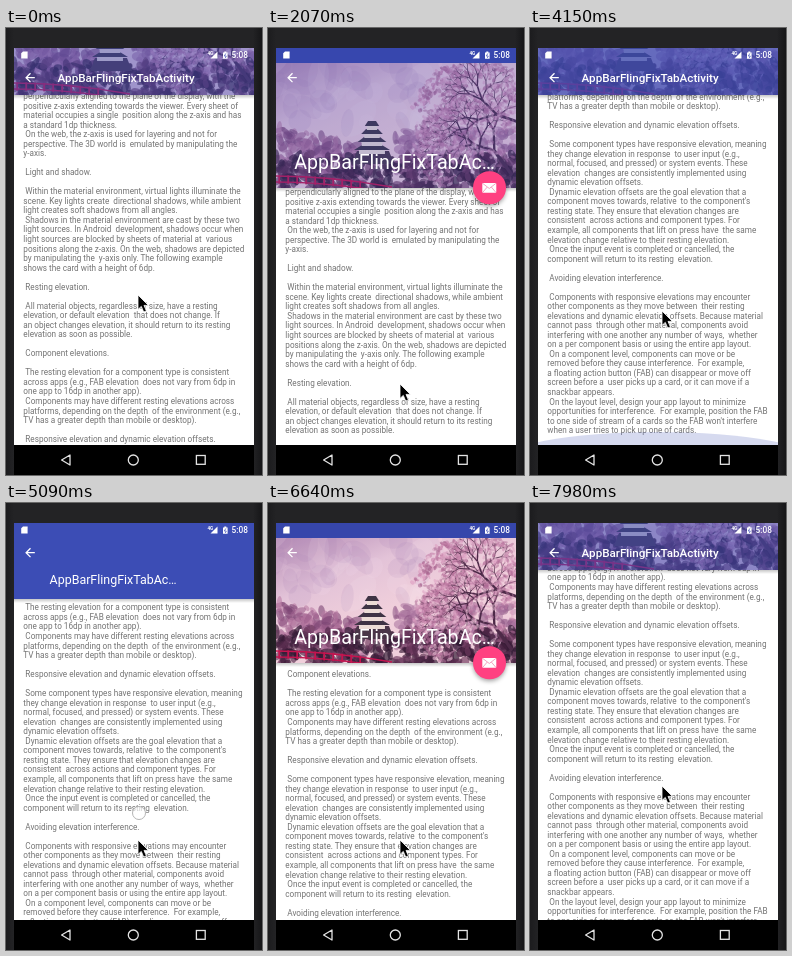
Recreate the animation shown at these times as an HTML page with a canvas. Size 256 px wide and 447 px high, loop 8000 ms.

```html
<!DOCTYPE html>
<html lang="en">
<head>
<meta charset="utf-8">
<title>Collapsing app bar</title>
<style>
html, body { margin: 0; width: 100%; height: 100%; overflow: hidden; background: #1e1e20; }
body { font-family: Roboto, "Noto Sans", sans-serif; }
#stage { position: relative; width: 256px; height: 447px; overflow: hidden;
  background: linear-gradient(90deg, #1c1c1e, #232325 8px, #232325 247px, #161618); }
#stage * { position: absolute; }
#screen { left: 8px; top: 20px; width: 240px; height: 398px; overflow: hidden; background: #fff; }
#text { left: 9.3px; top: 0; margin: 0; font: 8.2px/9.53px Roboto, "Noto Sans", sans-serif;
  color: #737373; white-space: pre; }
#glow { left: -40px; bottom: -46px; width: 319px; height: 60px; border-radius: 50%;
  background: rgba(63, 81, 181, .22); }
#header { left: 0; top: 0; width: 100%; overflow: hidden; background: #3646ab; }
#shade { left: 0; width: 100%; height: 4px; background: linear-gradient(rgba(0,0,0,.22), transparent); }
#photo { left: 0; bottom: 0; }
#scrim { inset: 0; background: #3c4db5; }
#title { left: 0; top: 0; line-height: 24px; color: #fff; white-space: pre; }
#fab { left: 197px; top: 0; width: 32.6px; height: 32.6px; border-radius: 50%;
  background: #ff4081; box-shadow: 0 2px 4px rgba(0,0,0,.35); }
#clock { left: 217.5px; top: 2px; font-size: 8.3px; line-height: 10px; font-weight: 500; color: #fff; }
#overlay { left: 0; top: 0; }
#touch { fill: rgba(255,255,255,.65); stroke: #b5b5b5; stroke-width: 1; }
</style>
</head>
<body>
<div id="stage">
  <div id="screen">
    <pre id="text">perpendicularly aligned to the plane of the display, with the
positive z-axis extending towards the viewer. Every sheet of
material occupies a single  position along the z-axis and has
a standard 1dp thickness.
 On the web, the z-axis is used for layering and not for
perspective. The 3D world is  emulated by manipulating the
y-axis.

 Light and shadow.

 Within the material environment, virtual lights illuminate the
scene. Key lights create  directional shadows, while ambient
light creates soft shadows from all angles.
 Shadows in the material environment are cast by these two
light sources. In Android  development, shadows occur when
light sources are blocked by sheets of material at  various
positions along the z-axis. On the web, shadows are depicted
by manipulating the  y-axis only. The following example
shows the card with a height of 6dp.

 Resting elevation.

 All material objects, regardless of size, have a resting
elevation, or default elevation  that does not change. If
an object changes elevation, it should return to its resting
elevation as soon as possible.

 Component elevations.

 The resting elevation for a component type is consistent
across apps (e.g., FAB elevation  does not vary from 6dp in
one app to 16dp in another app).
 Components may have different resting elevations across
platforms, depending on the depth  of the environment (e.g.,
TV has a greater depth than mobile or desktop).

 Responsive elevation and dynamic elevation offsets.

 Some component types have responsive elevation, meaning
they change elevation in response  to user input (e.g.,
normal, focused, and pressed) or system events. These
elevation  changes are consistently implemented using
dynamic elevation offsets.
 Dynamic elevation offsets are the goal elevation that a
component moves towards, relative  to the component's
resting state. They ensure that elevation changes are
consistent  across actions and component types. For
example, all components that lift on press have  the same
elevation change relative to their resting elevation.
 Once the input event is completed or cancelled, the
component will return to its resting  elevation.

 Avoiding elevation interference.

 Components with responsive elevations may encounter
other components as they move between  their resting
elevations and dynamic elevation offsets. Because material
cannot pass  through other material, components avoid
interfering with one another any number of ways,  whether
on a per component basis or using the entire app layout.
 On a component level, components can move or be
removed before they cause interference.  For example,
a floating action button (FAB) can disappear or move off
screen before a  user picks up a card, or it can move if a
snackbar appears.
 On the layout level, design your app layout to minimize
opportunities for interference.  For example, position the FAB
to one side of stream of a cards so the FAB won't interfere
when a user tries to pick up one of cards.</pre>
    <div id="glow"></div>
    <div id="shade"></div>
    <div id="header">
      <canvas id="photo" width="240" height="125"></canvas>
      <div id="scrim"></div>
    </div>
    <div id="title"></div>
    <div id="fab">
      <svg width="32.6" height="32.6" viewBox="0 0 32.6 32.6">
        <rect x="9.3" y="11.6" width="14" height="9.8" rx="1" fill="#fff"/>
        <path d="M9.8 12.2l6.5 5 6.5-5M9.8 21l4.4-5.2M22.8 21l-4.4-5.2" fill="none" stroke="#f08bb0" stroke-width=".8"/>
      </svg>
    </div>
    <div id="clock">5:08</div>
  </div>
  <svg id="overlay" width="256" height="447" viewBox="0 0 256 447">
    <g fill="#fff">
      <path d="M17 23.5h4.6v7h-6.4v-5.2z"/>
      <path d="M211.5 23.5v7h-7z"/>
      <path d="M217 24.4h1.3v-1h2v1h1.3v6.4H217z"/>
      <text x="201.4" y="27" font-size="4.6" font-weight="700">4G</text>
    </g>
    <path d="M219.9 25.4l-1.6 2.6h2l-1 2" fill="none" stroke="#3c4db5" stroke-width=".7"/>
    <path d="M28.8 49.7h-8.4M24.5 45.3l-4.4 4.4 4.4 4.4" fill="none" stroke="#fff" stroke-width="1.3"/>
    <path fill="#000" d="M8 417h240v30H8z"/>
    <g fill="none" stroke="#e4e4e4" stroke-width="1.3">
      <path d="M64 427v10l-8.4-5z" stroke-linejoin="round"/>
      <circle cx="127.3" cy="432" r="5"/>
      <rect x="190.4" y="427.5" width="8.8" height="8.8"/>
    </g>
    <circle id="touch" cx="133" r="6.5"/>
    <path id="cursor" d="M0 0v14.4l3.3-3 2.4 5.6 2.7-1.1-2.4-5.5h4.4z"
      fill="#000" stroke="#fff" stroke-width=".8"/>
  </svg>
</div>
<script>
const LOOP = 8000, PASS = 3960, LEAD = 1460; // one pass: open, collapse, drag open again
const MIN = 66.5, MAX = 159.6;
const $ = id => document.getElementById(id);

const ramp = (t, from, to) => Math.min(1, Math.max(0, (t - from) / (to - from)));
const smooth = x => x * x * (3 - 2 * x);
const slowing = x => 1 - (1 - x) ** 2;
const bump = (t, from, to) => Math.sin(Math.PI * ramp(t, from, to));

// moves: start, duration, distance
const flings = [[0, 900, 3.4], [2650, 1230, -317], [4700, 1450, 94.5], [6200, 2000, -71]];
const swipes = [[520, 500, 89], [3100, 500, -73], [4480, 500, 54], [7060, 500, -54]];
const travel = (moves, ease, t) =>
  moves.reduce((sum, [at, ms, way]) => sum + way * ease(ramp(t, at, at + ms)), 0);

function paintPhoto() {
  const c = $('photo').getContext('2d');
  let seed = 11;
  const rnd = () => (seed = seed * 16807 % 2147483647) / 2147483647;
  const pinks = ['#dc9cbf', '#c47fa8', '#efc9dc', '#a96590'];
  const darks = ['#3a1c38', '#55294c', '#6f3a60', '#2b1730'];

  function poly(color, ...p) {
    c.fillStyle = color;
    c.beginPath();
    for (let i = 0; i < p.length; i += 2) c.lineTo(p[i], p[i + 1]);
    c.fill();
  }
  function blobs(n, colors, alpha, size, place) {
    c.globalAlpha = alpha;
    for (let i = 0; i < n; i++) {
      const [x, y] = place(rnd(), rnd());
      c.fillStyle = colors[Math.floor(rnd() * colors.length)];
      c.beginPath();
      c.ellipse(x, y, size * (.4 + rnd()), size * (.3 + rnd() * .5), rnd() * 3, 0, 7);
      c.fill();
    }
    c.globalAlpha = 1;
  }
  function grow(x, y, len, dir) {
    const ex = x + len * Math.cos(dir), ey = y + len * Math.sin(dir);
    c.strokeStyle = '#4d2a48';
    c.lineWidth = len / 9;
    c.beginPath();
    c.moveTo(x, y);
    c.lineTo(ex, ey);
    c.stroke();
    blobs(3, pinks, .5, 2.6, (a, b) => [ex + (a - .5) * 11, ey + (b - .5) * 9]);
    if (len < 5) return;
    for (const turn of [-.5, .45]) grow(ex, ey, len * (.68 + rnd() * .16), dir + turn + rnd() * .3 - .15);
  }

  const sky = c.createLinearGradient(0, 0, 40, 100);
  sky.addColorStop(0, '#b48bb5');
  sky.addColorStop(.55, '#e3c3d8');
  sky.addColorStop(1, '#f0cfdb');
  c.fillStyle = sky;
  c.fillRect(0, 0, 240, 125);
  blobs(40, ['#f4e2ec', '#a47fae'], .13, 16, (a, b) => [a * 150, b * 60]);

  // woods and bank
  blobs(160, ['#9c5f8c', '#7d4674', '#b97ba3'], .6, 6, (a, b) => [a * 90, 62 + a * 22 + b * 40]);
  blobs(190, ['#a8719c', '#c48fb4', '#8a5482'], .55, 6, (a, b) => [118 + a * 122, 68 + b * 44]);
  blobs(320, darks, .65, 6, (a, b) => [a * 240, 92 + b * 34]);

  // castle, bottom tier first
  poly('#4a3548', 76, 101, 81, 88, 113, 88, 118, 101);
  for (let i = 0; i < 4; i++) {
    const half = 18 - 3.6 * i, y = 86 - 8 * i;
    c.fillStyle = '#ecdcd6';
    c.fillRect(96 - half * .72, y, half * 1.44, 5);
    poly('#3e3344', 96 - half, y + 1, 96 - half * .55, y - 4, 96 + half * .55, y - 4, 96 + half, y + 1);
  }

  // cherry trees and a hanging spray
  grow(236, 112, 30, -2.2);
  grow(205, 112, 22, -1.7);
  grow(245, 60, 26, -2.8);
  blobs(260, pinks, .4, 2.6, (a, b) => [240 - a * b * 100, 20 + a * 85]);
  blobs(100, pinks, .6, 2.8, (a, b) => [164 - a * 30 + b * 12, a * 44 + b * 5]);

  // bridge rails
  c.strokeStyle = '#c4144f';
  c.lineWidth = 1.4;
  for (const y of [113, 119]) {
    c.beginPath();
    c.moveTo(0, y);
    c.quadraticCurveTo(55, y, 116, y + 11);
    c.stroke();
  }
  for (let x = 3; x < 90; x += 9) c.strokeRect(x, 113 + x * x / 1300, .4, 7);
}

function draw(t) {
  const v = (t + LEAD) % PASS;
  const k = 1 - smooth(ramp(v, 400, 940)) + smooth(ramp(v, 2116, 3381));
  const h = MIN + (MAX - MIN) * k, folded = k < .005;
  const veil = ramp(v, 1190, 1790) - ramp(v, 2910, 3730);
  const fab = 1 - ramp(v, 740, 920) + ramp(v, 2800, 3000);

  $('header').style.height = h - 20 + 'px';
  $('shade').style.top = h - 20 + 'px';
  $('scrim').style.opacity = veil;
  $('text').style.top = Math.round(h + 1.5 + travel(flings, slowing, t) - 24.2) + 'px';
  $('glow').style.opacity = bump(t, 3800, 4400);

  const title = $('title');
  title.textContent = folded ? 'AppBarFlingFixTabActivity' : 'AppBarFlingFixTabAc…';
  title.style.fontWeight = folded ? 500 : 400;
  title.style.fontSize = 11.65 + 8 * k * k + 'px';
  title.style.transform = `translate(${43.6 - 25.4 * k}px, ${18.3 + 84.2 * k}px)`;

  $('fab').style.transform = `translateY(${h - 36.3}px) scale(${fab})`;
  $('fab').style.opacity = fab;

  $('touch').style.display = v > 2160 && v < 2760 ? '' : 'none';
  $('touch').setAttribute('cy', 214 + h);
  const x = 132 - 6 * bump(t, 6700, 7700), y = 267 + travel(swipes, smooth, t);
  $('cursor').setAttribute('transform', `translate(${x} ${y})`);
}

paintPhoto();
const start = performance.now();
(function tick() {
  draw((performance.now() - start) % LOOP);
  requestAnimationFrame(tick);
})();
</script>
</body>
</html>
```
